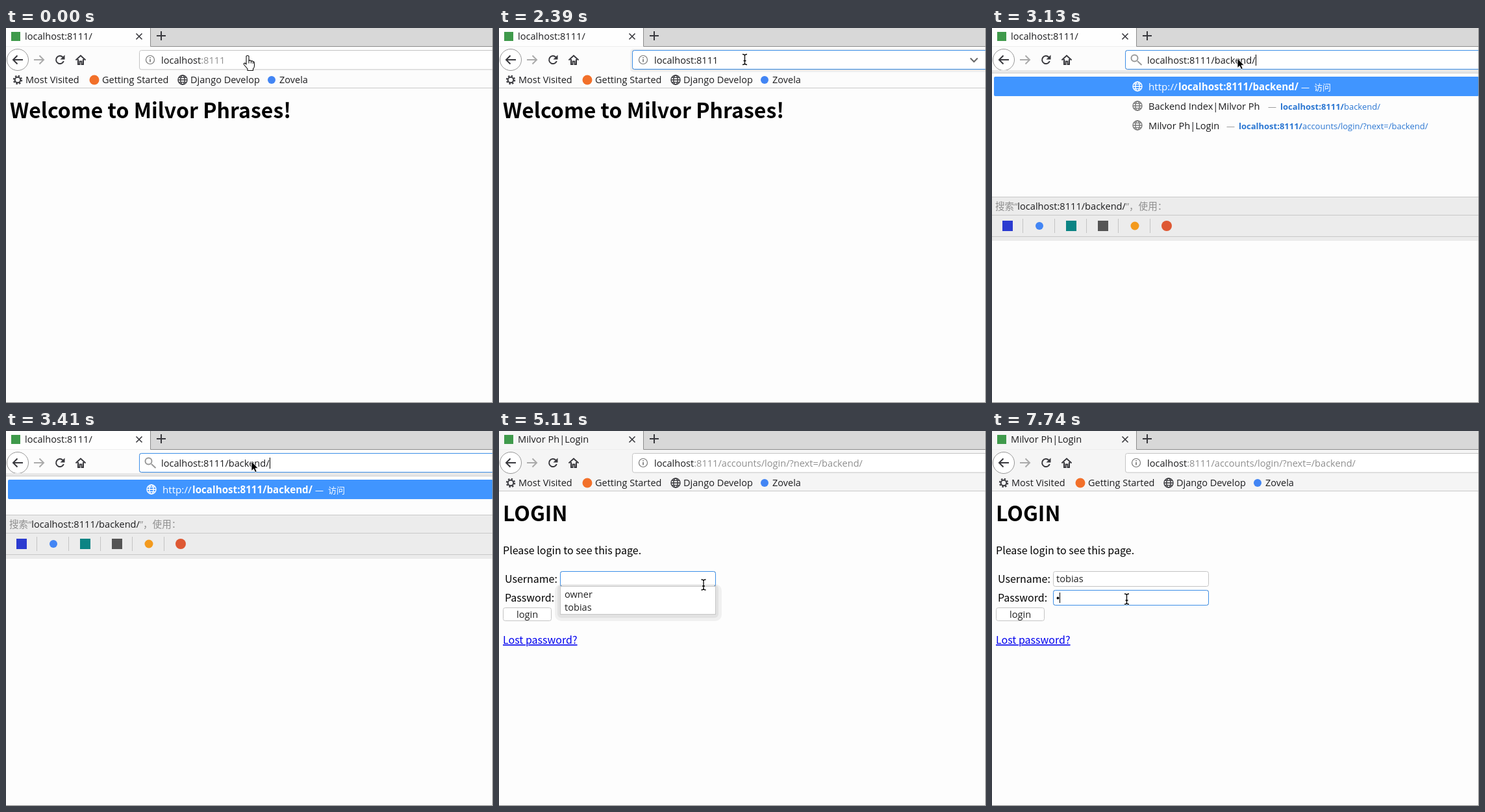
Write an HTML page that moves like this. It is 750 px wide and 578 px high and loops after 8000 ms.

```html
<!DOCTYPE html>
<html lang="en">
<head>
<meta charset="utf-8">
<title>Login walkthrough</title>
<style>
  html, body { margin: 0; width: 100%; height: 100%; overflow: hidden; background: #fdfdfd; }
  svg { display: block; width: 750px; height: 578px; }
  text { font: 14.6px "Open Sans", "Noto Sans CJK SC", sans-serif; fill: #1c1c1e; white-space: pre; }
  .page text { font: 16px "Noto Sans CJK SC", "Noto Sans CJK", sans-serif; fill: #000; }
  .page .h1 { font-size: 32px; font-weight: bold; }
  .page .ui { font: 14.6px "Open Sans", sans-serif; fill: #222; }
  .page .link { fill: #0000ee; text-decoration: underline; }
  .marks text { font-size: 14.5px; }
  .dim { fill: #8f8f8f; }
  .small { font-size: 13px; fill: #2a76d2; }
  .bold { font-weight: bold; }
  .first text { font-size: 15.2px; fill: #fff; }
  .first .small { font-size: 13px; fill: #fff; }
  .line { fill: none; stroke: #38383d; stroke-width: 2; }
  .caret { stroke: #000; stroke-width: 1; }
  .box { fill: #fff; stroke: #c4c4c4; }
  .focus { fill: none; stroke: #3c8fe8; }
</style>
</head>
<body>
<svg viewBox="0 0 750 578">
  <defs>
    <g id="globe" fill="none" stroke="currentColor" stroke-width="1.4">
      <circle r="7"/><ellipse rx="3.2" ry="7"/><path d="M-7 0H7M-6 -3.6H6M-6 3.6H6"/>
    </g>
    <path id="chevron" class="line" d="M726 46.5l5.5 5.5 5.5-5.5" style="stroke:#666"/>
    <path id="arrow" d="M0 0V14.5L3.4 11.4L5.8 16.6L8.2 15.5L5.9 10.4H10.2Z" fill="#000" stroke="#fff" stroke-width=".8"/>
    <g id="ibeam" fill="none">
      <path d="M-3.5 -8Q0 -8 0 -6Q0 -8 3.5 -8M0 -6V6M-3.5 8Q0 8 0 6Q0 8 3.5 8M-2 2H2" stroke="#fff" stroke-width="3"/>
      <path d="M-3.5 -8Q0 -8 0 -6Q0 -8 3.5 -8M0 -6V6M-3.5 8Q0 8 0 6Q0 8 3.5 8M-2 2H2" stroke="#000" stroke-width="1.3"/>
    </g>
    <path id="hand" d="M-2 1Q0 -1 2 1V8Q4 6.5 5.5 8.5Q7.5 7.5 8.5 9.5Q10.5 9 10.5 11V16Q10.5 19 8.5 20.5V23H0V20.5L-5.5 14Q-6.5 11.5 -4 11.5L-2 13.5Z M2 8V12M5.5 8.5V12M8.5 9.5V12.5" fill="#fff" stroke="#111" stroke-width="1.1" stroke-linejoin="round"/>
  </defs>

  <rect width="750" height="578" fill="#fdfdfd"/>

  <!-- page -->
  <g class="page">
    <text class="h1" x="6" y="139" data-on="0-3680">Welcome to Milvor Phrases!</text>
    <g data-on="3680-8000">
      <text class="h1" x="6" y="139">LOGIN</text>
      <text x="6" y="190">Please login to see this page.</text>
      <text x="9" y="234">Username:</text>
      <text x="9" y="263">Password:</text>
      <rect class="box" x="94.5" y="216.5" width="239" height="23" rx="3"/>
      <rect class="box" x="94.5" y="245.5" width="239" height="23" rx="3"/>
      <rect class="focus" x="94.5" y="216.5" width="239" height="23" rx="3" data-on="3680-6940"/>
      <rect class="focus" x="94.5" y="245.5" width="239" height="23" rx="3" data-on="6940-8000"/>
      <rect class="box" x="6.5" y="272.5" width="74" height="20" rx="3"/>
      <text class="ui" x="27" y="288">login</text>
      <text class="link" x="6" y="328">Lost password?</text>
      <text class="ui" x="99" y="233" data-on="6510-8000">tobias</text>
      <path class="caret" d="M99.5 220v16" data-on="3680-4720,4840-5110"/>
      <path class="caret" d="M144.5 220v16" data-on="6630-6940"/>
      <path class="caret" d="M99.5 249v16" data-on="7070-7740"/>
      <g data-on="7740-8000">
        <circle cx="101.5" cy="257.5" r="1.9"/><path class="caret" d="M104.5 249v16"/>
      </g>
      <g id="names" data-on="4990-6630">
        <rect x="86" y="236" width="257" height="57" rx="10" fill="#000" opacity=".05"/>
        <rect x="90" y="237" width="248" height="51" rx="6" fill="#000" opacity=".06"/>
        <rect x="94.5" y="239.5" width="239" height="43" fill="#fff" stroke="#c6c6c6"/>
        <rect x="95" y="242" width="238" height="20" fill="#ebebeb" data-on="5970-6240"/>
        <rect x="95" y="262" width="238" height="20" fill="#ebebeb" data-on="6240-6630"/>
        <text class="ui" x="101" y="257">owner</text>
        <text class="ui" x="101" y="277">tobias</text>
      </g>
    </g>
  </g>

  <!-- browser frame -->
  <rect width="750" height="28" fill="#d8d8d8"/>
  <rect width="222" height="29" fill="#fefefe"/>
  <rect y="29" width="750" height="63" fill="#fcfcfc"/>
  <g data-on="3680-8000" fill="#f5f5f5">
    <rect width="222" height="29"/><rect y="29" width="750" height="63"/>
  </g>
  <rect width="192" height="28" fill="#ebf0f4" data-on="3830-3980"/>
  <rect width="204" height="28" fill="#e1e9f0" data-on="3980-4110"/>
  <path d="M222.5 0V28.5H750" fill="none" stroke="#8c8c8c"/>
  <path d="M0 28.5H222" stroke="#eee"/>
  <path d="M0 92.5H750" stroke="#c9c9c9"/>
  <rect x="8" y="6" width="14" height="14" fill="#3f9a4b"/>
  <text x="29" y="18" data-on="0-3680">localhost:8111/</text>
  <text x="29" y="18" data-on="3680-8000">Milvor Ph|Login</text>
  <path class="line" d="M200.500 8.500l9 9m0-9l-9 9" style="stroke-width:1.6"/>
  <path class="line" d="M232 12h14M239 5v14"/>

  <circle cx="18" cy="49" r="16.5" fill="#fff" stroke="#979797"/>
  <path class="line" d="M26 49H11M17.5 42.5L11 49l6.5 6.5"/>
  <path class="line" d="M43 49H58M51.5 42.5L58 49l-6.5 6.5" style="stroke:#aaa"/>
  <g data-on="0-3560,4420-8000">
    <path class="line" d="M87.5 45A6 6 0 1 0 88.8 51"/><path d="M90.5 41.5v7h-7z" fill="#38383d"/>
  </g>
  <path class="line" d="M77.5 43.5l11 11m0-11l-11 11" data-on="3560-3830"/>
  <path class="line" d="M77.5 43.5l11 11m0-11l-11 11" style="stroke:#888" data-on="3830-3980"/>
  <path class="line" d="M77 43.5l7.5 7" style="stroke:#aaa" data-on="3980-4110"/>
  <path class="line" d="M78 52A6 6 0 0 0 85 55" style="stroke:#999" data-on="4110-4260"/>
  <path class="line" d="M80 43.5A6 6 0 1 0 88.8 51" data-on="4260-4420"/>
  <path class="line" d="M107.5 49.5L115 42.5l7.5 7M111 48v8h2.500V51.500h3V56h2.500V48"/>

  <rect x="202" y="32" width="560" height="36" rx="5" fill="#000" opacity=".05" data-on="280-2700,3560-4570"/>
  <rect class="box" x="205.5" y="34.5" width="560" height="29.5" rx="3"/>
  <rect class="focus" x="205.5" y="34.5" width="560" height="29" rx="3" data-on="1260-3560"/>
  <g data-on="0-2700,3560-8000">
    <circle cx="222" cy="49" r="6.5" fill="none" stroke="#777" stroke-width="1.2"/>
    <path d="M222 48v4.5M222 45v1.6" stroke="#666" stroke-width="1.5"/>
  </g>
  <path class="line" d="M224 51l6.5 6" style="stroke:#999" data-on="2700-3560"/>
  <circle class="line" cx="219.5" cy="46.5" r="5" style="stroke:#999" data-on="2700-3560"/>
  <g id="address"></g>
  <use href="#chevron" opacity=".45" data-on="410-550,4420-4570"/>
  <use href="#chevron" data-on="550-2700,3560-4420"/>

  <g class="marks">
    <circle cx="18" cy="80" r="4.3" class="line"/>
    <circle cx="18" cy="80" r="6.2" class="line" stroke-dasharray="2.4 2.47"/>
    <text x="30" y="85">Most Visited</text>
    <circle cx="136" cy="80" r="7.5" fill="#f2702a"/>
    <text x="148" y="85">Getting Started</text>
    <use href="#globe" x="272" y="80" color="#38383d"/>
    <text x="284" y="85">Django Develop</text>
    <circle cx="409" cy="80" r="6" fill="#4285f4"/>
    <text x="421" y="85">Zovela</text>
  </g>

  <!-- address suggestions -->
  <g data-on="2700-3560">
    <rect y="65" width="750" height="5" fill="#e8e8e8"/>
    <rect id="panel" y="69" width="750" fill="#fdfdfd"/>
    <path d="M0 69.5H750" stroke="#cfcfcf"/>
    <rect x="3" y="75" width="747" height="30" rx="2" fill="#4095ff"/>
    <g id="rows"></g>
    <g id="foot">
      <rect x="-6" y="50" width="770" height="18" rx="6" fill="#ebebeb"/>
      <rect width="750" height="61" fill="#ececec"/>
      <path d="M0 .5H750M0 28.5H750M0 61.5H750" stroke="#c8c8c8"/>
      <g id="engines"></g>
      <text x="5" y="20" class="dim">搜索“<tspan id="query" fill="#1c1c1e"></tspan>”，使用：</text>
    </g>
  </g>

  <path d="M749.5 0V577.5H0" fill="none" stroke="#858585"/>
  <use id="cursor"/>
</svg>
<script>
const LOOP = 8000;
const $ = id => document.getElementById(id);
const HOST = 'localhost:8111/';

const address = (on, strong, dim = '') =>
  `<text x="239" y="55" data-on="${on}">${strong}<tspan class="dim">${dim}</tspan></text>`;
const caret = (on, x) => `<path class="caret" d="M${x} 41v17" data-on="${on}"/>`;
$('address').innerHTML =
  address('0-1260', 'localhost', ':8111') +
  address('1260-2700', 'localhost:8111') +
  address('2700-2850', HOST) +
  address('2850-2980', HOST + 'ba') +
  address('2980-3560', HOST + 'backend/') +
  address('3560-3680', 'localhost', ':8111/backend/') +
  address('3680-8000', 'localhost', ':8111/accounts/login/?next=/backend/') +
  caret('1260-2390', 337.5) + caret('2700-2850', 343.5) +
  caret('2850-2980', 360.5) + caret('2980-3560', 406.5);

const globe = (y, color) => `<use href="#globe" x="224" y="${y}" color="${color}"/>`;
const visit = (on, path, dash) => `<g class="first" data-on="${on}">${globe(90, '#fff')}
  <text x="241" y="96">http://<tspan x="287" class="bold">${HOST}${path}</tspan></text>
  <text x="${dash}" y="96" class="small">—</text><text x="${dash + 20}" y="96" class="small">访问</text></g>`;
const row = (on, n, title, dash, bold, rest) => {
  const y = 96 + 30 * n;
  return `<g data-on="${on}">${globe(y - 6, '#777')}<text x="241" y="${y}">${title}</text>
    <text x="${dash}" y="${y}" class="small" style="fill:#999">—</text>
    <text x="${dash + 19}" y="${y}" class="small"><tspan class="bold">${bold}</tspan>${rest}</text></g>`;
};
$('rows').innerHTML =
  visit('2700-3130', '', 408) + visit('3130-3560', 'backend/', 476) +
  row('2700-3410', 1, 'Backend Index|Milvor Ph', 425, HOST, 'backend/') +
  row('2700-3410', 2, 'Milvor Ph|Login', 361, HOST, 'accounts/login/?next=/backend/') +
  row('2700-3130', 3, 'localhost:8111', 350, '', '切换到标签页') +
  '<path d="M196 176h12v7h2v2h-16v-2h2z" fill="#777" data-on="2700-3130"/>' +
  row('2700-3130', 4, 'Milvor Ph|logout', 368, HOST, 'accounts/logout/') +
  row('2980-3130', 5, 'Milvor Ph|Login', 361, HOST, 'accounts/login/');

const engines = [['#2b3bd0', 0], ['#4285f4', 6], ['#0b8484', 0], ['#555', 0], ['#f39a1d', 6.5], ['#de5833', 8]];
$('engines').innerHTML = engines.map(([color, r], i) => {
  const x = 24 + 49 * i;
  const mark = r ? `<circle cx="${x}" cy="45" r="${r}" fill="${color}"/>`
                 : `<rect x="${x - 8}" y="37" width="16" height="16" fill="${color}"/>`;
  return mark + (i < 5 ? `<path d="M${x + 23.5} 34v22" stroke="#c4c4c4"/>` : '');
}).join('');

// [start, value...] steps
const cursorSteps = [
  [0, 'hand', 372, 42.5], [280, 'ibeam', 374, 44], [410, 'ibeam', 375, 43], [1110, 'ibeam', 378.5, 48.5],
  [2700, 'arrow', 378, 47], [3560, 'ibeam', 378.5, 48.5], [4420, '', 0, 0],
  [4570, 'arrow', 323, 245], [4720, 'ibeam', 320, 240], [4840, 'ibeam', 315, 237],
  [5820, 'arrow', 245, 238], [5970, 'arrow', 226, 246], [6090, 'arrow', 212, 255],
  [6240, 'arrow', 211, 265], [6360, 'arrow', 213, 274], [6790, 'arrow', 203, 257], [6940, 'ibeam', 207.5, 259]
];
const footSteps = [[0, 230], [2980, 260], [3410, 129]];
const querySteps = [[0, HOST], [2850, HOST + 'ba'], [2980, HOST + 'backend/']];
const at = (steps, t) => steps.filter(s => s[0] <= t).pop().slice(1);

const timed = [...document.querySelectorAll('[data-on]')].map(el =>
  [el, el.dataset.on.split(',').map(span => span.split('-').map(Number))]);

function draw(t) {
  for (const [el, spans] of timed)
    el.style.display = spans.some(([from, to]) => t >= from && t < to) ? '' : 'none';

  const [shape, x, y] = at(cursorSteps, t);
  $('cursor').setAttribute('href', '#' + shape);
  $('cursor').setAttribute('transform', `translate(${x} ${y})`);

  const [top] = at(footSteps, t);
  $('panel').setAttribute('height', top - 69);
  $('foot').setAttribute('transform', `translate(0 ${top})`);
  $('query').textContent = at(querySteps, t)[0];
  $('names').style.opacity = t < 5110 || t >= 6510 ? 0.6 : 1;
}

const start = performance.now();
function tick() {
  draw((performance.now() - start) % LOOP);
  requestAnimationFrame(tick);
}
tick();
</script>
</body>
</html>
```
